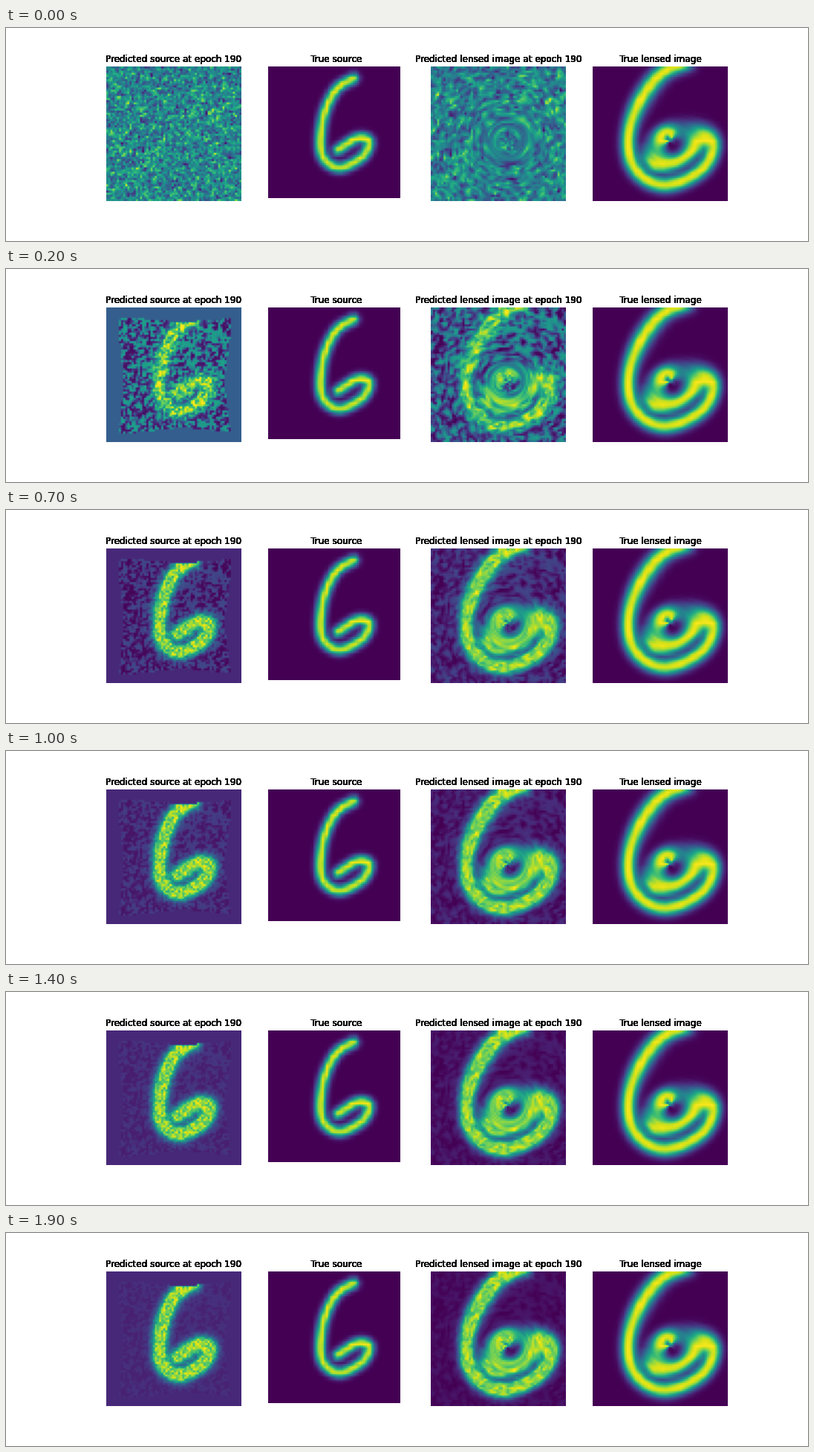
These frames come from a looping animation (1080 by 288 pixels, 2000 ms). A matplotlib script:

```python
import numpy as np
import matplotlib.pyplot as plt
from matplotlib.animation import FuncAnimation

W, H, DPI = 1080, 288, 72
FRAMES, INTERVAL = 20, 100
N = 64                            # cells per side of each image
CENTRE = np.array([0.571, 0.555])  # lens position, unit square
BEND = np.array([0.131, 0.113])    # deflection along x and y

# Key points of the handwritten digit, in pixels of its 178 px panel
KEYS = np.array([(115, 16), (91, 32), (74, 70), (72, 118), (95, 137),
                 (127, 122), (136, 101), (120, 97), (94, 113)])


def spline(points, steps=50):
    """Catmull-Rom curve through the points."""
    p = np.vstack([points[:1], points, points[-1:]])
    t = np.linspace(0, 1, steps)[:, None]
    parts = []
    for a, b, c, d in zip(p, p[1:], p[2:], p[3:]):
        parts.append(b + t * (c - a) / 2
                     + t ** 2 * (a - 2.5 * b + 2 * c - d / 2)
                     + t ** 3 * (3 * (b - c) + d - a) / 2)
    return np.vstack(parts)


def grid(n):
    """Cell centres of an n by n image on the unit square."""
    c = (np.arange(n) + 0.5) / n
    return np.meshgrid(c, c)


def corners(n, x, y):
    """Indices and weights for bilinear sampling."""
    u = np.clip(x * n - 0.5, 0, n - 1)
    v = np.clip(y * n - 0.5, 0, n - 1)
    i = np.minimum(u.astype(int), n - 2)
    j = np.minimum(v.astype(int), n - 2)
    return i, j, u - i, v - j


def sample(img, x, y):
    i, j, a, b = corners(len(img), x, y)
    top = img[j, i] * (1 - a) + img[j, i + 1] * a
    low = img[j + 1, i] * (1 - a) + img[j + 1, i + 1] * a
    return top * (1 - b) + low * b


def draw_digit(width):
    """Soft stroke on a coarse grid, then enlarged."""
    px, py = spline(KEYS).T
    x, y = grid(28)
    dist = np.hypot(178 * x[..., None] - px,
                    178 * y[..., None] - py).min(axis=2)
    coarse = np.clip(1.15 * np.exp(-(dist / width) ** 2), 0, 1)
    return sample(coarse, *grid(N))


def trace_rays():
    """Source position seen by every cell of the lensed image."""
    x, y = grid(N)
    dx, dy = x - CENTRE[0], y - CENTRE[1]
    r = np.hypot(dx, dy) + 1e-6
    return x - BEND[0] * dx / r, y - BEND[1] * dy / r


def reached_cells(x, y):
    seen = np.zeros((N, N), bool)
    i, j, _, _ = corners(N, x, y)
    for a in (0, 1):
        for b in (0, 1):
            seen[j + b, i + a] = True
    return seen


rng = np.random.default_rng(7)


def clumps(mix):
    """Unit noise in which neighbouring cells share part of their value."""
    g = rng.standard_normal((N, N))
    g = g + mix * (np.roll(g, 1, 0) + np.roll(g, 1, 1))
    return g / g.std()


start = np.clip(0.47 + 0.16 * clumps(0.2), 0, 1)
noise = np.tanh(2 * clumps(0.5))
grain = rng.uniform(-1, 1, (N, N))

digit = draw_digit(6.3)
glow = draw_digit(8.8)
rays = trace_rays()
seen = reached_cells(*rays)


def predicted(k):
    """Reconstructed source after k steps of training."""
    if k == 0:
        return start
    flat = max(0.115, 0.5 * 0.775 ** k)
    amp = 0.02 + 0.38 * 0.8 ** k
    mask = np.clip((1.5 - 0.6 * 0.8 ** k) * glow, 0, 1)
    value = flat + (0.82 - flat) * mask
    value += amp * noise * (1 - 0.4 * mask) + 0.17 * grain * mask
    return np.where(seen, np.clip(value, 0, 1), flat)


fig = plt.figure(figsize=(W / DPI, H / DPI), dpi=DPI, facecolor="white")


def panel(left, size, title, img):
    ax = fig.add_axes([left / W, (H - 52 - size) / H, size / W, size / H])
    ax.axis("off")
    # Stacked copies give the heavy, hard-edged lettering
    for _ in range(16):
        fig.text((left + 91) / W, (H - 46) / H, title, fontsize=12,
                 family="DejaVu Sans", ha="center", va="baseline")
    return ax.imshow(img, cmap="viridis", vmin=0, vmax=1, aspect="auto",
                     interpolation="hanning")


source = panel(135, 182, "Predicted source at epoch 190", start)
panel(353.4, 178, "True source", digit)
lensed = panel(571.7, 182, "Predicted lensed image at epoch 190",
               sample(start, *rays))
panel(790, 182, "True lensed image", sample(glow, *rays))


def update(k):
    img = predicted(k)
    view = sample(img, *rays)
    source.set_data(img)
    lensed.set_data(view)
    lensed.set_clim(view.min(), view.max())
    return source, lensed


anim = FuncAnimation(fig, update, frames=FRAMES, interval=INTERVAL,
                     repeat=True, repeat_delay=0, blit=False)
plt.show()
```
